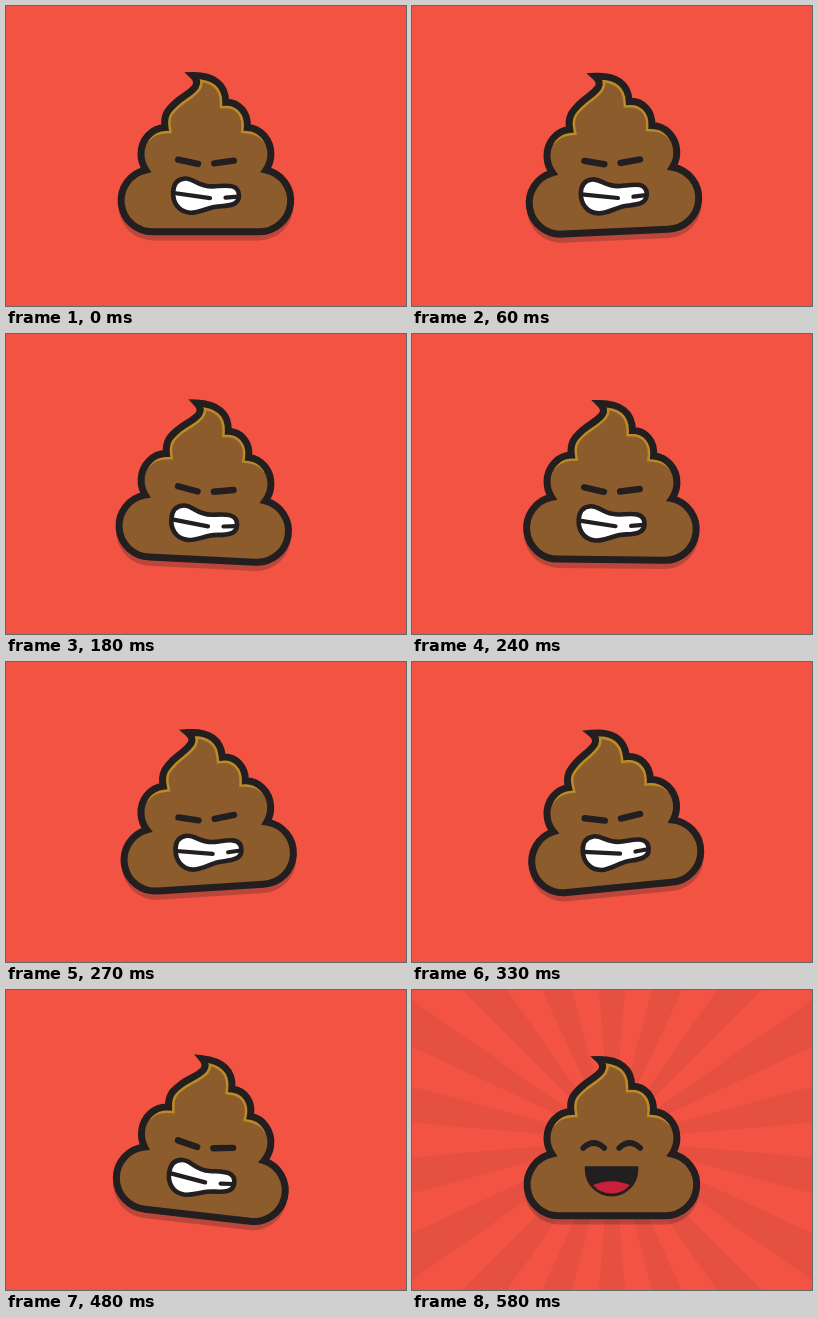
These frames come from a looping animation (400x300 px, 1720 ms). An HTML page:

```html
<!DOCTYPE html>
<html lang="en">
<head>
<meta charset="utf-8">
<title>Shake and smile</title>
<style>
  html, body { margin: 0; width: 100%; height: 100%; overflow: hidden; background: #f25343; }
  svg { display: block; width: 100vw; height: 100vh; }
</style>
</head>
<body>
<svg viewBox="0 0 400 300">
  <defs>
    <path id="shape" d="M186.8 69.6 C207 69.4 219.6 78 219.8 96.3 C233 96 242.5 107 241.3 121.4
      C254.5 122 264.9 134 264.9 148 C264.9 154 263.4 159 260 164
      A31.2 31.2 0 0 1 252.6 225.7 H147.2 A31.2 31.2 0 0 1 139.8 164
      C136.5 159 135 154 135 148 C135 134 145.5 122 159 121.5
      C157 108 163 103 170 96.5 C178 89.5 185 87 189.5 80.5 C192 76.5 190.5 73.2 186.8 69.6 Z"/>
    <clipPath id="inside"><use href="#shape"/></clipPath>
  </defs>
  <rect width="400" height="300" fill="#f25343"/>
  <path id="rays" fill="#e55040"/>
  <g id="body">
    <rect x="112.5" y="165.5" width="174.8" height="69" rx="34.5" fill="#231f20" opacity=".26"/>
    <use href="#shape" fill="#8c5c2c"/>
    <path clip-path="url(#inside)" fill="none" stroke="#bc8a26" stroke-width="12"
      d="M138 132 C143 125.5 151.5 121.8 159 121.5 C157 108 163 103 170 96.5
      C178 89.5 185 87 189.5 80.5 C192 76.5 190.5 73.2 186.8 69.6
      C207 69.4 219.6 78 219.8 96.3 C233 96 242.5 107 241.3 121.4 C249 122 257.5 125.5 262 132"/>
    <use href="#shape" fill="none" stroke="#231f20" stroke-width="7"/>
    <g id="angry" fill="none" stroke="#231f20" stroke-linecap="round">
      <path stroke-width="6.4" d="M172.2 153.6 L192 157.9 M208.2 157.4 L227.8 154.7"/>
      <path fill="#fff" stroke-width="4.6" d="M179 172.5 C188 172 192 181 207 180.4
        C218 180 233 176.5 233 189.5 C233 202.5 215 199 207 201.2
        C198 203.5 191 207.2 184 206.7 C172 205.7 166.6 196 167.1 186 C167.6 178 171 173 179 172.5 Z"/>
      <path stroke-width="4.2" d="M168 187 L204 192.2 M219.5 191.6 L232 190.6"/>
    </g>
    <g id="happy">
      <path fill="none" stroke="#231f20" stroke-width="5.6" stroke-linecap="round"
        d="M171.2 158 Q181.7 148 192.2 158 M207.2 158 Q217.7 148 228.2 158"/>
      <path fill="#231f20" d="M172.8 176.3 H226.3 V179.7 A26.75 26.75 0 0 1 172.8 179.7 Z"/>
      <path fill="#c8203a" d="M181 195 Q199.5 187.4 218 195 Q211 203.5 199.5 203.5 Q188 203.5 181 195 Z"/>
    </g>
  </g>
</svg>
<script>
  const LOOP = 1720, STEP = 30, SMILE = 580, LAST = 17;
  // Tilt keys: [step, degrees]
  const KEYS = [[0, 0], [3, -4], [7, 5], [10, -8], [17, 9]];
  const $ = id => document.getElementById(id);
  const body = $('body'), rays = $('rays'), angry = $('angry'), happy = $('happy');

  function rayPath(count, width, radius) {
    const at = deg => {
      const a = deg * Math.PI / 180;
      return `${200 + radius * Math.sin(a)} ${150 - radius * Math.cos(a)}`;
    };
    let d = '';
    for (let i = 0; i < count; i++) {
      const mid = i * 360 / count;
      d += `M200 150 L${at(mid - width / 2)} L${at(mid + width / 2)} Z`;
    }
    return d;
  }

  function tilt(step) {
    const i = Math.max(1, KEYS.findIndex(k => k[0] >= step));
    const [s0, a0] = KEYS[i - 1], [s1, a1] = KEYS[i];
    return a0 + (a1 - a0) * (step - s0) / (s1 - s0);
  }

  const show = (el, on) => el.setAttribute('visibility', on ? 'visible' : 'hidden');

  function draw(t) {
    const smiling = t >= SMILE;
    const angle = smiling ? 0 : tilt(Math.min(LAST, Math.floor(t / STEP)));
    body.setAttribute('transform', `rotate(${angle} 200 150)`);
    show(rays, smiling);
    show(happy, smiling);
    show(angry, !smiling);
  }

  rays.setAttribute('d', rayPath(18, 10, 400));
  const start = performance.now();
  function tick() {
    draw((performance.now() - start) % LOOP);
    requestAnimationFrame(tick);
  }
  tick();
</script>
</body>
</html>
```
